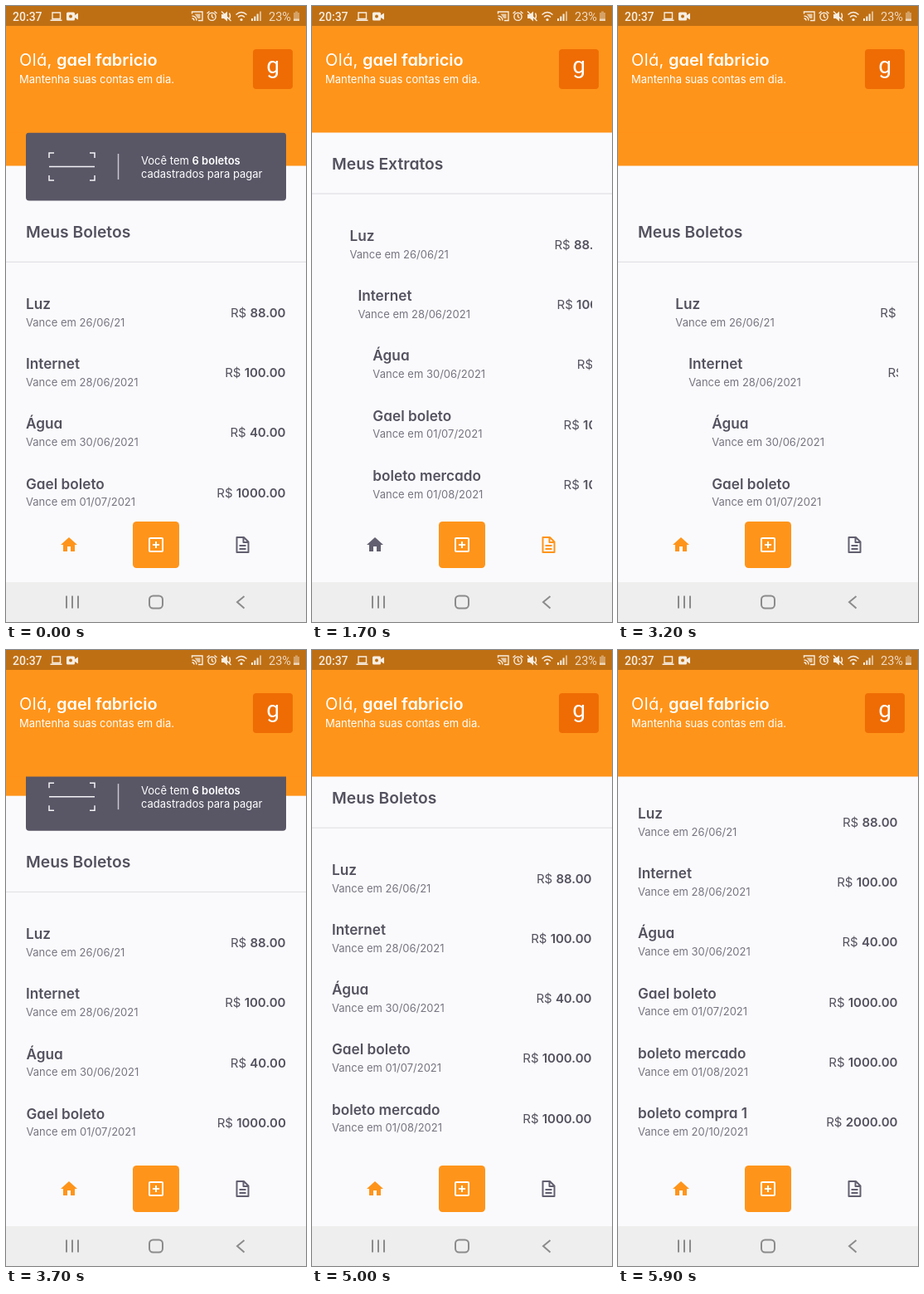
An HTML page for the animation above (6000 ms loop, 362x742 px).

```html
<!DOCTYPE html>
<html lang="pt-BR">
<head>
<meta charset="utf-8">
<title>Meus Boletos</title>
<style>
  html, body { margin: 0; width: 100%; height: 100%; overflow: hidden; background: #fafafc; }
  svg { display: block; width: 362px; height: 742px; }
  text { font-family: Inter, sans-serif; white-space: pre; }
  .h { font-weight: 600; fill: #54525f; font-feature-settings: "cv11"; }
  .title { font-size: 19.3px; }
  .name { font-size: 17.2px; }
  .due { font-size: 13px; fill: #777580; }
  .price { font-size: 15px; fill: #54525f; text-anchor: end; }
  .light { font-size: 13px; fill: #fff; }
  .hello { font-size: 20px; fill: #fff; font-feature-settings: "cv11"; }
  .b { font-weight: 600; }
  .sys { font-family: Roboto, sans-serif; fill: #f7eee3; }
  .line { fill: none; stroke-width: 2; }
</style>
</head>
<body>
<svg viewBox="0 0 362 742">
  <defs>
    <clipPath id="view"><rect y="152" width="362" height="452"/></clipPath>
    <clipPath id="list"><rect x="24" y="200" width="314" height="620"/></clipPath>
  </defs>
  <rect width="362" height="742" fill="#fafafc"/>

  <g clip-path="url(#view)">
    <g id="home">
      <rect y="150" width="362" height="42.5" fill="#ff941a"/>
      <g id="card">
        <rect x="24" y="152.5" width="314" height="82" rx="4" fill="#595666"/>
        <g class="line" stroke="#f4f3f6" style="stroke-width:1.5">
          <path d="M52 183v-6h6M101 177h6v6M107 204v6h-6M58 210h-6v-6M52 193.5h55"/>
          <path d="M135.5 178v31" stroke="#c9c8d0"/>
        </g>
        <text class="light" x="163" y="190.5">Você tem <tspan class="b">6 boletos</tspan></text>
        <text class="light" x="163" y="206.5">cadastrados para pagar</text>
      </g>
      <text class="h title" x="24" y="279">Meus Boletos</text>
      <rect y="307.7" width="362" height="1.2" fill="#e2e2e5"/>
      <g id="homeRows" clip-path="url(#list)"></g>
    </g>
    <g id="extract">
      <text class="h title" x="24" y="196.5">Meus Extratos</text>
      <rect y="225.5" width="362" height="1.2" fill="#e2e2e5"/>
      <g transform="translate(0 -82)"><g id="extractRows" clip-path="url(#list)"></g></g>
    </g>
    <path id="glow" d="M0 603.5V596Q181 576 362 596V603.5Z" fill="#ff941a"/>
  </g>

  <rect width="362" height="152.5" fill="#ff941a"/>
  <text class="hello" x="16" y="72" letter-spacing=".4">Olá,</text>
  <text class="hello b" x="61" y="72">gael fabricio</text>
  <text class="light" x="16" y="93">Mantenha suas contas em dia.</text>
  <rect x="298" y="52" width="48" height="48" rx="4" fill="#ef6c04"/>
  <text x="322" y="81" text-anchor="middle" fill="#fff" style="font:28px Roboto,sans-serif">g</text>

  <rect width="362" height="24" fill="#bf6f13"/>
  <text class="sys" x="8" y="17.5" font-size="14" font-weight="500">20:37</text>
  <text class="sys" x="317" y="17.5" font-size="14.5" opacity=".85">23%</text>
  <g fill="#f7eee3">
    <path d="M74.500 7.500h7q1.500 0 1.500 1.500v2l4-2.500v8l-4-2.500v2q0 1.500-1.500 1.500h-7q-1.500 0-1.500-1.500v-7q0-1.500 1.500-1.500z"/>
    <circle cx="78" cy="12.500" r="2" fill="#bf6f13"/>
    <path d="M260 10h3l4-3.500v12l-4-3.500h-3z"/>
    <path d="M296 15h2v3h-2zM299.300 12.500h2v5.500h-2zM302.600 9.500h2v8.500h-2z"/>
    <path d="M306 6.500h2v11.500h-2z" opacity=".6"/>
    <path d="M347 8h2v-1.500h3v1.500h2v10h-7z" opacity=".4"/>
    <path d="M347 15.500h7v2.500h-7z" opacity=".7"/>
    <circle cx="284" cy="16.500" r="1.600"/>
  </g>
  <g class="line" stroke="#f7eee3" style="stroke-width:1.4">
    <path d="M56 8h9.500v7.500h-9.500zM53.500 17.300h14"/>
    <path d="M224.500 9.500v-2.500h12.500v10.500h-5M224.500 12a5.500 5.500 0 0 1 5.500 5.500M224.500 15a2.500 2.500 0 0 1 2.500 2.500"/>
    <path d="M227.500 9.500h7v5.500h-3z" fill="#f7eee3" stroke="none" opacity=".7"/>
    <circle cx="248.500" cy="12.800" r="4.600"/>
    <path d="M248.500 10v3l2 1.500M242.500 9l3-2.500M254.500 9l-3-2.500"/>
    <path d="M260 6.500l11.500 11.500M269.500 8.500q2 3.500 0 7"/>
    <path d="M277.500 10.500q6.500-6 13 0M280 13.500q4-3.800 8 0"/>
  </g>

  <circle id="ripple" cy="649" fill="#ebebed"/>
  <path id="homeIcon" transform="translate(64 637)" d="M10 20v-6h4v6h5v-8h3L12 3 2 12h3v8z"/>
  <rect x="153" y="621" width="56" height="56" rx="4.500" fill="#ff941a"/>
  <g class="line" stroke="#fff">
    <rect x="173" y="641" width="16" height="16" rx="1"/>
    <path d="M181 645v8M177 649h8"/>
  </g>
  <g id="docIcon" class="line" stroke-linejoin="round">
    <path d="M278.500 640h8.500l5.500 5.500v12.500h-14zM286.500 640v6h6M281.500 650h8M281.500 654h8"/>
  </g>

  <rect y="694" width="362" height="48" fill="#eeeeee"/>
  <g class="line" stroke="#8b8b8b">
    <path d="M73 710.500v15M80 710.500v15M87 710.500v15M287.500 711l-8.500 7 8.500 7.500"/>
    <rect x="173" y="710.500" width="16" height="15" rx="4.500"/>
  </g>
</svg>
<script>
  const LOOP = 6000, STEP = 100, PITCH = 72.2;
  const ORANGE = '#ff941a', GREY = '#625f70';
  const TO_EXTRACT = 1000, TO_HOME = 2600;
  const bills = [
    ['Luz', '26/06/21', '88.00'],
    ['Internet', '28/06/2021', '100.00'],
    ['Água', '30/06/2021', '40.00'],
    ['Gael boleto', '01/07/2021', '1000.00'],
    ['boleto mercado', '01/08/2021', '1000.00'],
    ['boleto compra 1', '20/10/2021', '2000.00']
  ];
  const delays = [0, 55, 130, 130, 130, 130];
  const scrollKeys = [[3600, 0], [4100, 162], [4700, 162], [5373, 0], [5420, 0], [5880, 162]];
  const taps = [[800, 285.5], [2400, 76]];

  const $ = id => document.getElementById(id);
  const clamp = v => Math.min(1, Math.max(0, v));
  const part = (t, a, b) => clamp((t - a) / (b - a));
  const smooth = u => u * u * (3 - 2 * u);
  const move = (el, x, y) => el.setAttribute('transform', `translate(${x} ${y})`);

  // CSS "ease" curve, solved by bisection
  const cubic = (s, a, b) => 3 * s * (1 - s) * (1 - s) * a + 3 * s * s * (1 - s) * b + s ** 3;
  function ease(u) {
    if (u <= 0 || u >= 1) return clamp(u);
    let lo = 0, hi = 1;
    for (let i = 0; i < 24; i++) {
      const mid = (lo + hi) / 2;
      if (cubic(mid, .25, .25) < u) lo = mid; else hi = mid;
    }
    return cubic(lo, .1, 1);
  }

  function fillList(list) {
    list.innerHTML = bills.map(([name, due, price], i) => {
      const y = i * PITCH;
      return `<g><text class="h name" x="24" y="${365 + y}">${name}</text>
        <text class="due" x="24" y="${385.7 + y}">Vance em ${due}</text>
        <text class="price" x="337.5" y="${375 + y}">R$ <tspan class="b">${price}</tspan></text></g>`;
    }).join('');
    return [...list.children];
  }
  const homeRows = fillList($('homeRows'));
  const extractRows = fillList($('extractRows'));

  function slide(rows, t, start) {
    rows.forEach((row, i) => {
      const from = start + delays[i];
      move(row, 362 * (1 - ease(part(t, from, from + 1000))), 0);
    });
  }

  function scrollAt(t) {
    let y = 0;
    scrollKeys.forEach(([at, to], i) => {
      const [prevAt, prev] = scrollKeys[i - 1] || [at, to];
      if (t >= prevAt) y = at > prevAt ? prev + (to - prev) * smooth(part(t, prevAt, at)) : to;
    });
    return y;
  }

  function draw(t) {
    const onExtract = t >= TO_EXTRACT && t < TO_HOME;
    const homeStart = t < TO_EXTRACT ? -2000 : 2615;
    $('home').style.display = onExtract ? 'none' : '';
    $('extract').style.display = onExtract ? '' : 'none';
    $('homeIcon').style.fill = onExtract ? GREY : ORANGE;
    $('docIcon').style.stroke = onExtract ? ORANGE : GREY;

    slide(extractRows, t, TO_EXTRACT);
    slide(homeRows, t, homeStart);
    move($('card'), 0, -742 * (1 - ease(part(t, homeStart, homeStart + 1000))));
    move($('home'), 0, -scrollAt(t));

    const [tapAt, x] = taps[t < 2000 ? 0 : 1];
    const ripple = $('ripple');
    ripple.setAttribute('cx', x);
    ripple.setAttribute('r', 35 * Math.sqrt(part(t, tapAt, tapAt + 200)));
    ripple.style.opacity = 1 - part(t, tapAt + 300, tapAt + 600);

    $('glow').style.opacity = .33 * part(t, 4000, 4200) * (1 - part(t, 4200, 4700));
  }

  const begin = performance.now();
  function tick() {
    const t = Math.max(0, performance.now() - begin) % LOOP;
    draw(Math.floor(t / STEP) * STEP);
    requestAnimationFrame(tick);
  }
  tick();
</script>
</body>
</html>
```
